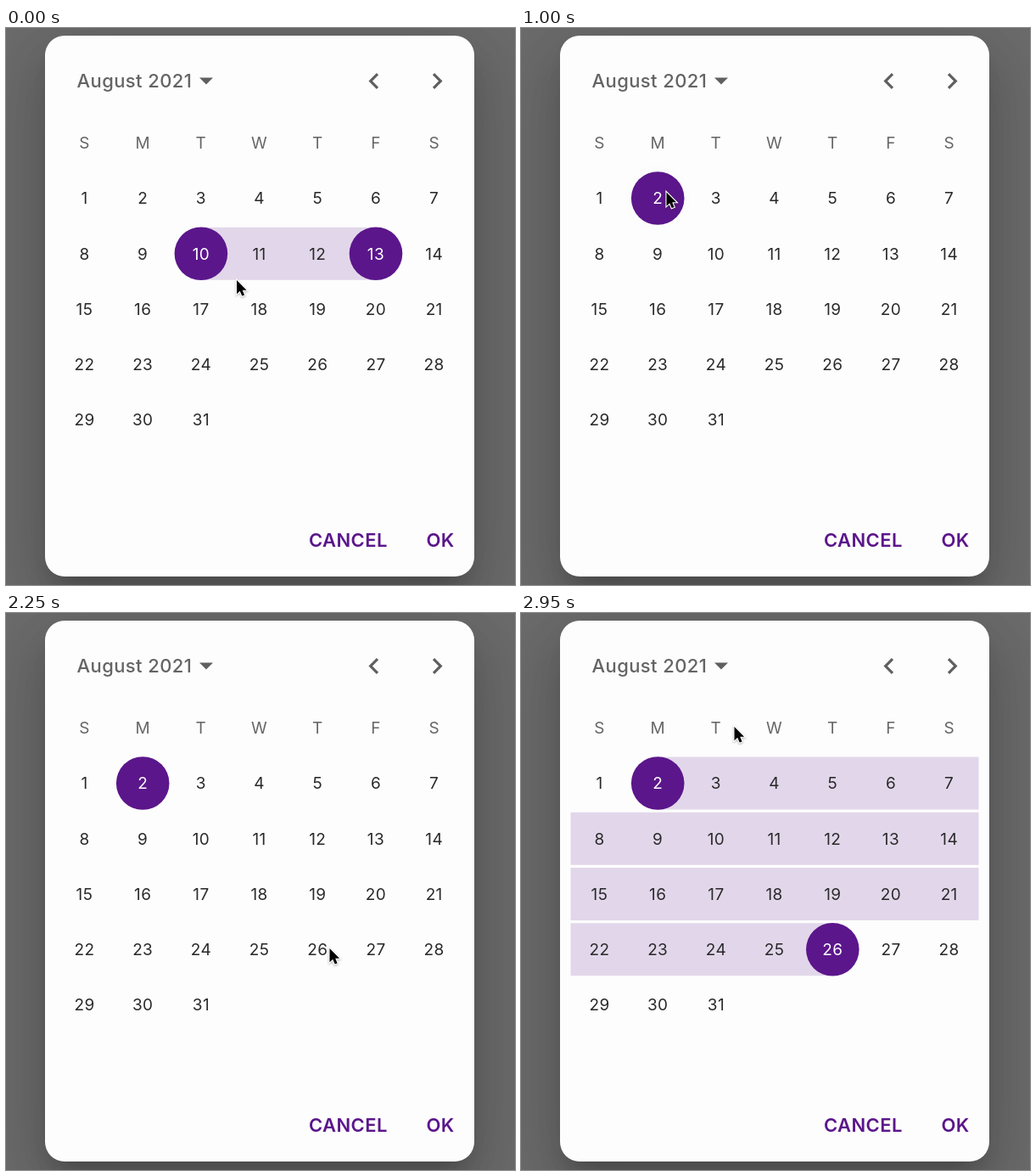
Write an HTML page that moves like this. It is 600x656 px and loops after 3 s.

```html
<!DOCTYPE html>
<html lang="en">
<head>
<meta charset="utf-8">
<style>
  html, body { margin: 0; width: 100%; height: 100%; overflow: hidden; background: #6b6b6b; }
  .card {
    position: absolute; left: 46px; top: 9px; width: 505.5px; height: 636.5px;
    border-radius: 23px; background: #fdfdfd;
    box-shadow: 0 18px 25px -12px rgba(0,0,0,.2), 0 40px 64px 5px rgba(0,0,0,.12), 0 15px 78px 14px rgba(0,0,0,.1);
  }
  svg { position: absolute; left: 0; top: 0; }
  text { font-family: Inter, sans-serif; font-size: 19px; letter-spacing: .4px; }
  .day, .week { text-anchor: middle; }
  .day { fill: #2a2a2a; }
  .week { fill: #666; }
  .title { font-size: 22px; font-weight: 500; fill: #646464; }
  .button { font-size: 22px; font-weight: 600; fill: #5b168b; }
  .icon { fill: #5f5f5f; }
  .range { fill: #e2d7ea; }
  .end { fill: #5b168b; }
</style>
</head>
<body>
<div class="card"></div>
<svg width="600" height="656" viewBox="0 0 600 656">
  <text class="title" x="83.5" y="70">August 2021</text>
  <path class="icon" d="M228 58.5h16l-8 8z"/>
  <path class="icon" transform="translate(414.9 43.7) scale(1.57)" d="M15.41 7.41 14 6l-6 6 6 6 1.41-1.41L10.83 12z"/>
  <path class="icon" transform="translate(489.4 43.7) scale(1.57)" d="M10 6 8.59 7.41 13.17 12l-4.58 4.59L10 18l6-6z"/>
  <text class="button" x="357" y="611">CANCEL</text>
  <text class="button" x="495.5" y="611">OK</text>
  <circle id="hover" cx="161.2" cy="200.5" r="39"/>
  <g id="marks"></g>
  <g id="days"></g>
  <path id="cursor" d="M0 0V16.2L3.7 12.8 6.2 18.6 9.1 17.4 6.7 11.7H11.6z"
    stroke="#fff" stroke-width="2.2" paint-order="stroke"
    style="filter:drop-shadow(0 1px 1px rgba(0,0,0,.3))"/>
</svg>
<script>
const LOOP = 3000, STEP = 50, LEFT = 58.5, RIGHT = 539.5, RADIUS = 31;
const $ = id => document.getElementById(id);
const colX = day => 92.5 + 68.7 * ((day - 1) % 7);
const rowY = day => 200.5 + 65.25 * Math.floor((day - 1) / 7);

function add(parent, tag, attrs, text = '') {
  const el = document.createElementNS('http://www.w3.org/2000/svg', tag);
  for (const key in attrs) el.setAttribute(key, attrs[key]);
  el.textContent = text;
  return parent.appendChild(el);
}

[...'SMTWTFS'].forEach((name, i) =>
  add($('days'), 'text', { class: 'week', x: colX(i + 1), y: 142 }, name));
const labels = Array.from({ length: 31 }, (_, i) =>
  add($('days'), 'text', { class: 'day', x: colX(i + 1), y: rowY(i + 1) + 6.8 }, i + 1));

let shown = '';
function select(first, last) {
  const key = first + '-' + last;
  if (key === shown) return;
  shown = key;
  $('marks').replaceChildren();
  for (let day = first; day <= last && first < last;) {
    const weekEnd = Math.ceil(day / 7) * 7;
    const x = day === first ? colX(day) : LEFT;
    const end = last <= weekEnd ? colX(last) : RIGHT;
    add($('marks'), 'rect', {
      class: 'range', x, y: rowY(day) - RADIUS, width: end - x, height: 2 * RADIUS
    });
    day = weekEnd + 1;
  }
  for (const day of new Set([first, last]))
    add($('marks'), 'circle', { class: 'end', cx: colX(day), cy: rowY(day), r: RADIUS + .3 });
  labels.forEach((el, i) =>
    el.style.fill = i + 1 === first || i + 1 === last ? '#fff' : '');
}

// Cursor stops: time, x, y
const path = [
  [0, 272, 297], [600, 171.5, 193.5], [1050, 171.5, 193.5], [1550, 395.5, 409],
  [1650, 395.5, 409], [1950, 381.5, 395], [2400, 381.5, 395], [2950, 251.5, 134], [LOOP, 251.5, 134]
];
const ease = p => p * p * (3 - 2 * p);

function cursorAt(t) {
  const i = path.findIndex(stop => stop[0] > t);
  const [t0, x0, y0] = path[i - 1], [t1, x1, y1] = path[i];
  const p = ease((t - t0) / (t1 - t0));
  return [x0 + (x1 - x0) * p, y0 + (y1 - y0) * p];
}

function draw(now) {
  const t = Math.floor(now % LOOP / STEP) * STEP;
  if (t < 900) select(10, 13);
  else if (t < 2300) select(2, 2);
  else select(2, 26);
  const fade = t < 900 ? (t - 550) / 250 : (1050 - t) / 150;
  $('hover').setAttribute('opacity', .014 * Math.max(0, Math.min(1, fade)));
  $('cursor').setAttribute('transform', `translate(${cursorAt(t)})`);
}

const start = performance.now();
function tick() {
  draw(performance.now() - start);
  requestAnimationFrame(tick);
}
tick();
</script>
</body>
</html>
```
